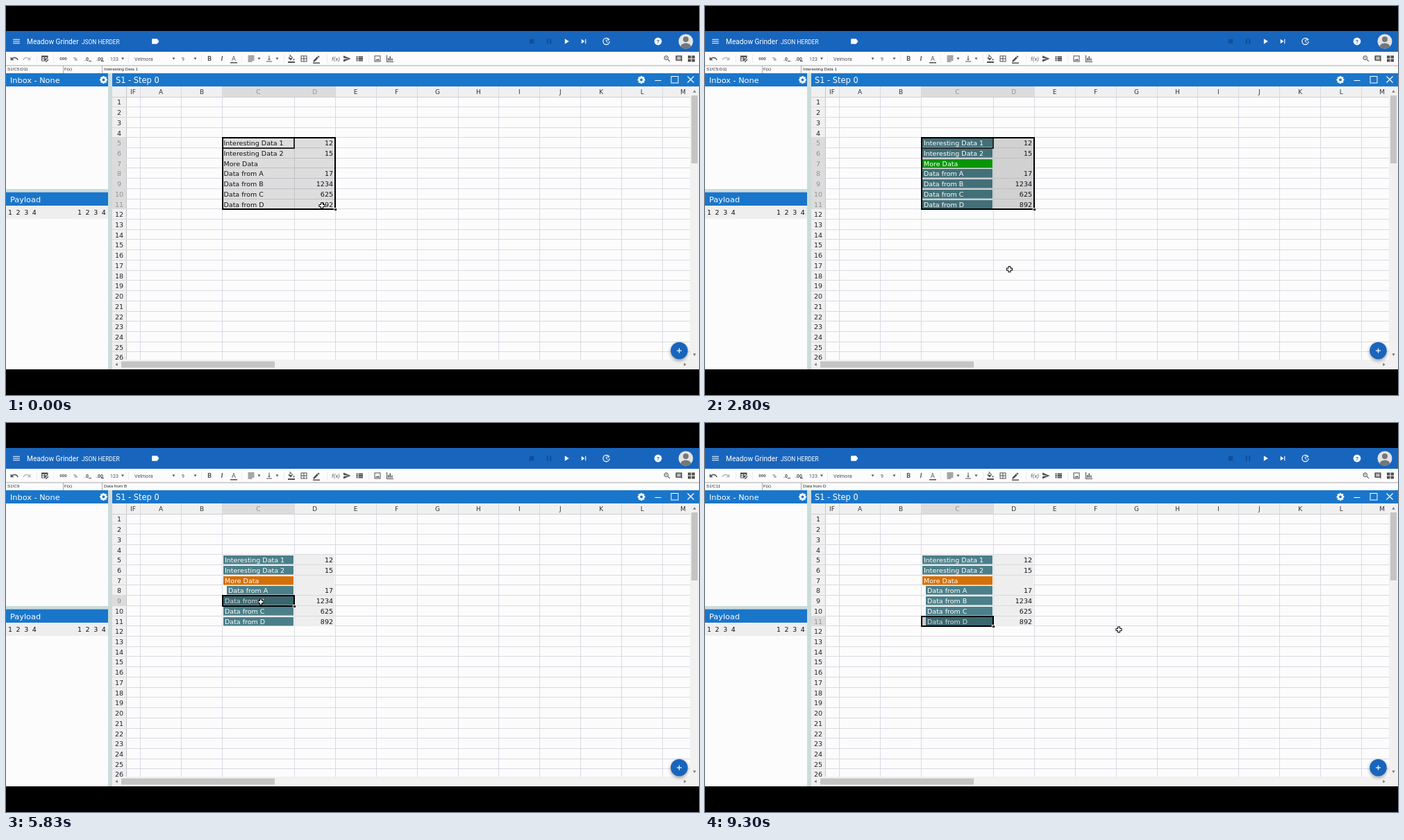
These frames come from a looping animation (998x561 px, 9410 ms). An HTML page with a canvas:

```html
<!DOCTYPE html>
<html lang="en">
<head>
<meta charset="utf-8">
<title>Spreadsheet range demo</title>
<style>
html, body { margin: 0; width: 100%; height: 100%; overflow: hidden; background: #000; }
canvas { display: block; }
</style>
</head>
<body>
<canvas id="stage" width="998" height="561"></canvas>
<script>
const ctx = document.getElementById('stage').getContext('2d');
const LOOP = 9410;
const GRID = '"DejaVu Sans", sans-serif', UI = 'Roboto, sans-serif', ARIAL = '"Liberation Sans", sans-serif';
const DARK = '#505050', BLUE = '#1865bd', PANEL = '#1a76ca', PAPER = '#fcfcfc';

// Icons on a 24 unit square
const ICON = {
  menu: 'M3 18h18v-2H3zM3 13h18v-2H3zM3 6v2h18V6z',
  label: 'M17.63 5.84C17.27 5.33 16.67 5 16 5H5a2 2 0 0 0-2 2v10c0 1.1.9 2 2 2h11c.67 0 1.27-.33 1.63-.84L22 12z',
  stop: 'M6 6h12v12H6z',
  pause: 'M6 5h4v14H6zM14 5h4v14h-4z',
  play: 'M8 5v14l11-7z',
  next: 'M6 18l8.5-6L6 6zM16 6v12h2V6z',
  undo: 'M12.5 8c-2.65 0-5.05.99-6.9 2.6L2 7v9h9l-3.62-3.62c1.39-1.16 3.16-1.88 5.12-1.88 3.54 0 6.55 2.31 7.6 5.5l2.37-.78C21.08 11.03 17.15 8 12.5 8z',
  send: 'M2 21L23 12 2 3v7l15 2-15 2z',
  edit: 'M3 17.25V21h3.75L17.81 9.94l-3.75-3.75zM20.7 7l-1.8 1.8-3.75-3.75L17 3.3h1.4l2.3 2.3z',
  list: 'M3 5h4v4H3zM9 5h13v4H9zM3 10h4v4H3zM9 10h13v4H9zM3 15h4v4H3zM9 15h13v4H9z',
  borders: 'M3 3h18v18H3zM5 5v6h6V5zM13 5v6h6V5zM5 13v6h6v-6zM13 13v6h6v-6z',
  align: 'M3 3h18v2H3zM3 7h18v2H3zM3 11h18v2H3zM3 15h18v2H3zM3 19h12v2H3z',
  bottom: 'M16 13h-3V3h-2v10H8l4 4zM4 19v2h16v-2z',
  fill: 'M16.5 9L7.6 0 6.2 1.4l2.4 2.4L2.8 10l7.2 7zM5.2 10L10 5.2 14.8 10zM19 11.5s-2 2.2-2 3.5a2 2 0 0 0 4 0c0-1.3-2-3.5-2-3.5zM2 20h20v4H2z',
  image: 'M3 3h18v18H3zM5 5v14h14V5zM6 17l3-4 2 2.7 3-4 4 5.3z',
  chart: 'M2 2h2v18h18v2H2zM6 10h3v8H6zM11 5h3v13h-3zM16 11h3v7h-3z',
  zoom: 'M15.5 14h-.8l-.3-.3A6.5 6.5 0 1 0 13.7 14.4l.3.3v.8l5 5 1.5-1.5zM9.5 14a4.5 4.5 0 1 1 0-9 4.5 4.5 0 0 1 0 9zM9 7h1v2h2v1h-2v2H9v-2H7V9h2z',
  comment: 'M2 2h20v20l-4-4H2zM6 6v2h12V6zM6 9v2h12V9zM6 12v2h12v-2z',
  tiles: 'M2 3h9v8H2zM13 3h9v8h-9zM2 13h9v8H2zM13 13h9v8h-9z',
  cut: 'M9.6 7.6A4 4 0 1 0 7.6 9.6L10 12l-2.4 2.4A4 4 0 1 0 9.6 16.4L12 14l7 7h3v-1zM6 8a2 2 0 1 1 0-4 2 2 0 0 1 0 4zM6 20a2 2 0 1 1 0-4 2 2 0 0 1 0 4zM19 3l-6 6 2 2 7-7V3z',
  copy: 'M16 1H2v16h2V3h12zM6 5h15v18H6zM8 7v14h11V7z',
  paste: 'M21 2h-6a3 3 0 0 0-6 0H3v20h18zM19 20H5V4h2v3h10V4h2z',
  trash: 'M6 7h12v14H6zM19 4h-3.5l-1-1h-5l-1 1H5v2h14z',
  indent: 'M3 3h18v2H3zM3 8v8l4-4zM11 7h10v2H11zM11 11h10v2H11zM11 15h10v2H11zM3 19h18v2H3z',
  outdent: 'M3 3h18v2H3zM7 8v8l-4-4zM11 7h10v2H11zM11 11h10v2H11zM11 15h10v2H11zM3 19h18v2H3z',
  sum: 'M18 4H6v2l6.5 6L6 18v2h12v-3h-7l5-5-5-5h7z',
  table: 'M2 3h19v7l-8 8v1H2zM4 8v3h6V8zM12 8v3h6V8zM4 13v4h6v-4zM14 20l7-7 2 2-7 7h-2z',
  define: 'M2 3h11v18H2zM4 5v4h7V5zM4 11v3h7v-3zM4 16v3h7v-3zM17 8h2v3h3v2h-3v3h-2v-3h-3v-2h3z',
  undefine: 'M2 3h11v18H2zM4 5v4h7V5zM4 11v3h7v-3zM4 16v3h7v-3zM15 8l3 3 3-3 1 1-3 3 3 3-1 1-3-3-3 3-1-1 3-3-3-3z'
};
for (const k in ICON) ICON[k] = new Path2D(ICON[k]);

function box(x, y, w, h, color) {
  ctx.fillStyle = color;
  ctx.fillRect(x, y, w, h);
}
function frame(x, y, w, h, width, color) {
  ctx.strokeStyle = color;
  ctx.lineWidth = width;
  ctx.strokeRect(x, y, w, h);
}
function disc(x, y, r, color) {
  ctx.fillStyle = color;
  ctx.beginPath();
  ctx.arc(x, y, r, 0, 7);
  ctx.fill();
}
function line(points, width, color) {
  ctx.strokeStyle = color;
  ctx.lineWidth = width;
  ctx.beginPath();
  points.forEach(([x, y]) => ctx.lineTo(x, y));
  ctx.stroke();
}
function text(s, x, y, size, color, font = GRID, align = 'left', style = '') {
  ctx.font = `${style} ${size}px ${font}`;
  ctx.textAlign = align;
  ctx.fillStyle = color;
  ctx.fillText(s, x, y + size * .36);
}
function icon(name, x, y, size, color, flip = 1) {
  ctx.save();
  ctx.translate(x, y);
  ctx.scale(size / 24 * flip, size / 24);
  ctx.translate(-12, -12);
  ctx.fillStyle = color;
  ctx.fill(ICON[name], 'evenodd');
  ctx.restore();
}
function arrow(x, y, dx, dy, s, color) {
  ctx.fillStyle = color;
  ctx.beginPath();
  ctx.moveTo(x + dx * s, y + dy * s);
  ctx.lineTo(x - dx * s + dy * s * 1.3, y - dy * s + dx * s * 1.3);
  ctx.lineTo(x - dx * s - dy * s * 1.3, y - dy * s - dx * s * 1.3);
  ctx.fill();
}
function gear(x, y) {
  ctx.save();
  ctx.translate(x, y);
  for (let i = 0; i < 4; i++) {
    box(-1.3, -5.4, 2.6, 10.8, '#fff');
    ctx.rotate(Math.PI / 4);
  }
  ctx.restore();
  disc(x, y, 4.2, '#fff');
  disc(x, y, 1.9, PANEL);
}

// Timeline
const DEFINED = 2250, MENU_OPEN = 430;
const LABELS = ['Interesting Data 1', 'Interesting Data 2', 'More Data', 'Data from A', 'Data from B', 'Data from C', 'Data from D'];
const VALUES = ['12', '15', '', '17', '1234', '625', '892'];
const INDENT = { 8: 4300, 9: 5900, 10: 7200, 11: 8200 };
const SELECT = [[3400, 8], [5350, 9], [6760, 10], [7700, 11]];
const PATH = [
  [0, 455, 288], [600, 455, 288], [770, 451, 357], [1050, 455, 420], [1600, 497, 495],
  [2400, 497, 495], [3250, 369, 243], [5000, 369, 243], [5280, 367, 258], [6400, 367, 258],
  [6640, 365, 272], [7330, 365, 272], [7600, 353.5, 290], [9200, 353.5, 290], [9300, 596, 298], [LOOP, 596, 298]
];
function pointer(t) {
  const i = Math.max(1, PATH.findIndex(p => p[0] > t));
  const [t0, x0, y0] = PATH[i - 1], [t1, x1, y1] = PATH[i];
  const u = (t - t0) / (t1 - t0), e = u * u * (3 - 2 * u);
  return [x0 + (x1 - x0) * e, y0 + (y1 - y0) * e];
}
const selected = t => SELECT.reduce((row, [at, r]) => t >= at ? r : row, 0);
const rowY = r => Math.round(131.4 + 14.72 * (r - 1));
const colX = i => i < 2 ? 193.5 + 59 * i : i === 2 ? 311.5 : 415.3 + 58.93 * (i - 3);

function drawHeader() {
  box(0, 36, 998, 30, BLUE);
  icon('menu', 15, 51, 13, '#fff');
  text('Meadow Grinder', 30, 51, 10.2, '#fff', UI);
  text('JSON HERDER', 109, 51.5, 8.4, '#fff', UI);
  icon('label', 215, 51, 13, '#fff');
  icon('stop', 757, 51, 13, '#114e98');
  icon('pause', 782, 51, 13, '#114e98');
  icon('play', 807, 51, 13, '#fff');
  icon('next', 832, 51, 13, '#fff');
  ctx.strokeStyle = '#fff';
  ctx.lineWidth = 1.2;
  ctx.beginPath();
  ctx.arc(864.5, 51, 4.6, 0, 5.5);
  ctx.stroke();
  arrow(868, 48.3, 1, 0, 1.7, '#fff');
  line([[864.5, 48.3], [864.5, 51.3], [866.7, 52.6]], 1, '#fff');
  disc(939, 51, 5.4, '#fff');
  text('?', 939, 51, 8, BLUE, UI, 'center', 'bold');
  ctx.save();
  disc(979, 51, 10.5, '#e3e3e3');
  ctx.clip();
  disc(979, 48, 4, '#75777a');
  ctx.beginPath();
  ctx.ellipse(979, 59, 7.5, 5.5, 0, 0, 7);
  ctx.fill();
  ctx.restore();
}

function drawToolbar() {
  box(0, 66, 998, 31, PAPER);
  const put = (name, x, size = 12, y = 76) => icon(name, x, y, size, DARK);
  const label = (s, x, size = 7, style = '') => text(s, x, 76, size, DARK, UI, 'center', style);
  put('undo', 12, 13);
  icon('undo', 30, 76, 13, '#b9b9b9', -1);
  put('table', 56);
  label('000', 82.5, 6, 'bold');
  label('%', 100, 8);
  label('.0', 116, 7, 'bold');
  label('.00', 135, 7, 'bold');
  line([[119, 79.5], [123, 79.5]], 1, DARK);
  line([[137, 79.5], [141, 79.5]], 1, DARK);
  label('123', 156, 7);
  text('Velmora', 185, 76, 7.2, DARK, UI);
  label('9', 255, 7);
  for (const x of [168, 241.5, 272.5, 364.5, 390.5]) arrow(x, 76, 0, 1, 1.5, DARK);
  label('B', 293, 9, 'bold');
  label('I', 311, 9, 'italic bold');
  label('A', 328, 9);
  box(323, 81, 10, 1.5, DARK);
  put('align', 353);
  put('bottom', 379);
  put('fill', 411);
  put('borders', 429);
  put('edit', 447);
  box(442, 81.5, 10, 1.5, DARK);
  label('f(x)', 475, 8, 'italic');
  put('send', 491);
  put('list', 509);
  put('image', 535);
  put('chart', 553);
  put('zoom', 952);
  put('comment', 969, 11);
  put('tiles', 987);
  for (const x of [44, 68, 176, 281, 339, 400, 462, 522]) box(x, 70, 1, 12, '#ececec');
}

function drawFormula(row) {
  box(0, 85.5, 998, 1, '#aaa');
  box(82, 86, 1, 11, '#aaa');
  box(138, 86, 1, 11, '#aaa');
  text(row ? 'S1!C' + row : 'S1!C5:D11', 2, 91, 6.2, '#222', ARIAL);
  text('F(x)', 84, 91, 6.2, '#222', ARIAL);
  text(LABELS[row ? row - 5 : 0], 141, 91, 6.2, '#222', ARIAL);
}

function drawPanels() {
  box(0, 97, 998, 427, PAPER);
  box(147, 97, 6, 427, '#cbdcda');
  box(0, 264, 147, 4, '#cbdcda');
  box(0, 97, 147, 19, PANEL);
  box(0, 268.5, 147, 19.5, PANEL);
  box(153, 97, 845, 19, PANEL);
  text('Inbox - None', 6, 106.5, 11.3, '#fff');
  text('Payload', 6, 278.5, 11.3, '#fff');
  text('S1 - Step 0', 158, 106.5, 11.4, '#fff');
  gear(140.5, 106.5);
  gear(915, 106.5);
  box(934.5, 107, 9, 1, '#fff');
  frame(958, 101.5, 10, 9.5, 1, '#fff');
  line([[981.5, 101.5], [990.5, 110.5]], 1.2, '#fff');
  line([[990.5, 101.5], [981.5, 110.5]], 1.2, '#fff');
  box(0, 289, 147, 18, '#eeeeee');
  for (let i = 0; i < 8; i++) text(i % 4 + 1, (i < 4 ? 6 : 106) + i % 4 * 11.6, 298, 9.5, '#111', GRID, 'center');
}

function drawGrid(row) {
  ctx.save();
  ctx.beginPath();
  ctx.rect(153, 116, 832, 394);
  ctx.clip();
  box(153, 116, 832, 15, '#f0f0f0');
  box(153, 116, 20, 394, '#f0f0f0');
  box(312, 116, row ? 103 : 162, 15, '#dcdcdc');
  const top = rowY(row || 5);
  box(153, top, 20, rowY(row ? row + 1 : 12) - top, '#dcdcdc');
  box(173, 116, 1, 394, '#c6c6cc');
  text('IF', 183, 124, 9, '#333', GRID, 'center');
  for (let i = 0; i < 13; i++) {
    const x = Math.floor(colX(i)), hot = i === 2 || (!row && i === 3);
    box(x, 116, 1, 394, '#d9d9e2');
    text('ABCDEFGHIJKLM'[i], (colX(i) + colX(i + 1)) / 2, 124, 9, hot ? '#929292' : '#333', GRID, 'center');
  }
  box(153, 131, 832, 1, '#cfcfd6');
  for (let r = 1; r <= 26; r++) {
    const hot = row ? r === row : r > 4 && r < 12;
    box(153, rowY(r + 1) - 1, 832, 1, '#d9d9e2');
    text(r, 163, rowY(r) + 7.5, 9.5, hot ? '#929292' : '#222', GRID, 'center');
  }
  ctx.restore();
}

function drawCells(t, row) {
  const defined = t >= DEFINED;
  for (let r = 5; r < 12; r++) {
    const y = rowY(r), inset = t >= INDENT[r] ? 5 : 0;
    if (defined) {
      const color = r !== 7 ? '#4b7f89' : t < INDENT[8] ? '#0aa90b' : '#d56f08';
      box(312, y, 103, 14, PAPER);
      box(313 + inset, y + 1, 101 - inset, 12.5, color);
      box(416, y, 57, 14, '#eeeeee');
    }
    if (!row) box(312, y, 162, rowY(r + 1) - y, 'rgba(0,0,0,.12)');
    else if (row === r) box(312, y, 103, 14, 'rgba(0,0,0,.2)');
    text(LABELS[r - 5], (defined ? 315 : 313.5) + inset, y + 7.5, 9.5, !defined ? '#111' : row === r ? '#d5dcdd' : '#fff');
    text(VALUES[r - 5], 471, y + 7.5, 9.5, '#111', GRID, 'right');
  }
  const top = rowY(row || 5), end = rowY(row ? row + 1 : 12), right = row ? 415 : 474;
  frame(312, top, right - 312, end - top, 2, '#000');
  if (!row) frame(312, top, 103, 15, 1.6, '#000');
  box(right - 2, end - 2, 4, 4, PAPER);
  box(right - 1, end - 1, 3, 3, '#000');
}

function drawScroll() {
  box(985, 116, 13, 408, '#f1f1f1');
  box(153, 510, 845, 14, '#f1f1f1');
  box(987, 129, 9, 98, '#c4c4c4');
  box(166, 512.5, 221, 9, '#c4c4c4');
  arrow(991.5, 123, 0, -1, 1.7, '#777');
  arrow(991.5, 503, 0, 1, 1.7, '#777');
  arrow(159, 517, -1, 0, 1.7, '#777');
  arrow(978, 517, 1, 0, 1.7, '#777');
  ctx.save();
  ctx.shadowColor = 'rgba(0,0,0,.4)';
  ctx.shadowBlur = 5;
  ctx.shadowOffsetY = 2;
  disc(969.5, 497, 12.3, BLUE);
  ctx.restore();
  box(966, 496.5, 7, 1.2, '#fff');
  box(968.9, 493.6, 1.2, 7, '#fff');
}

const MENU = [
  ['cut', 'Cut'], ['copy', 'Copy'], ['paste', 'Paste'], ['paste', 'Paste Content...'], ['trash', 'Delete...'],
  ['indent', 'Insert Cells...'], ['outdent', 'Delete Cells...'], ['sum', 'Insert Function...'],
  ['table', 'Format Cells...'], ['define', 'Define JSON Range'], ['undefine', 'Delete JSON Range']
];
function drawMenu(t, x, y) {
  if (t < MENU_OPEN || t >= DEFINED) return;
  const inside = x > 454 && y > 350;
  const hot = inside ? Math.round((y - 6 - 297) / 21.1) : 0;
  ctx.save();
  ctx.globalAlpha = Math.min(1, (t - MENU_OPEN) / 100);
  ctx.save();
  ctx.shadowColor = 'rgba(0,0,0,.35)';
  ctx.shadowBlur = 4;
  ctx.shadowOffsetY = 1;
  box(454.5, 283, 113, 239, '#fdfdfd');
  ctx.restore();
  MENU.forEach(([name, label], i) => {
    const cy = 297 + i * 21.1, off = i === 2 || i === 3;
    if (i === hot && !off) box(454.5, cy - 10.3, 113, 20.8, '#ebebeb');
    if (i === 5 || (i > 6 && i < 10)) box(454.5, cy - 10.8, 113, 1, '#e6e6e6');
    icon(name, 468, cy, 12, off ? '#b8b8b8' : '#555');
    text(label, 491, cy, 6.9, off ? '#b8b8b8' : '#333', UI);
  });
  ctx.restore();
}

const HAND = new Path2D('M-1.5 -5.5q1.3 -1 2 .2v3.6l3.6 .8q1 .3 1 1.4l-.7 4.5h-4.8l-3.3 -4.2q0 -1.3 2.2 -.3z');
function drawPointer(t, x, y) {
  ctx.save();
  ctx.translate(x, y);
  if (t >= MENU_OPEN && t < DEFINED && x > 454 && y > 350) {
    ctx.translate(.5, 0);
    ctx.fillStyle = '#fff';
    ctx.fill(HAND);
    ctx.strokeStyle = '#222';
    ctx.lineWidth = .9;
    ctx.stroke(HAND);
  } else {
    box(-4.5, -2, 9, 4, '#000');
    box(-2, -4.5, 4, 9, '#000');
    box(-3.5, -1, 7, 2, '#fff');
    box(-1, -3.5, 2, 7, '#fff');
  }
  ctx.restore();
}

function draw(now) {
  const t = now % LOOP, row = selected(t), [x, y] = pointer(t);
  box(0, 0, 998, 561, '#000');
  drawHeader();
  drawToolbar();
  drawFormula(row);
  drawPanels();
  drawGrid(row);
  drawCells(t, row);
  drawScroll();
  drawMenu(t, x, y);
  drawPointer(t, x, y);
  box(0, 524, 998, 37, '#000');
}

const start = performance.now();
function tick() {
  draw(performance.now() - start);
  requestAnimationFrame(tick);
}
tick();
</script>
</body>
</html>
```
